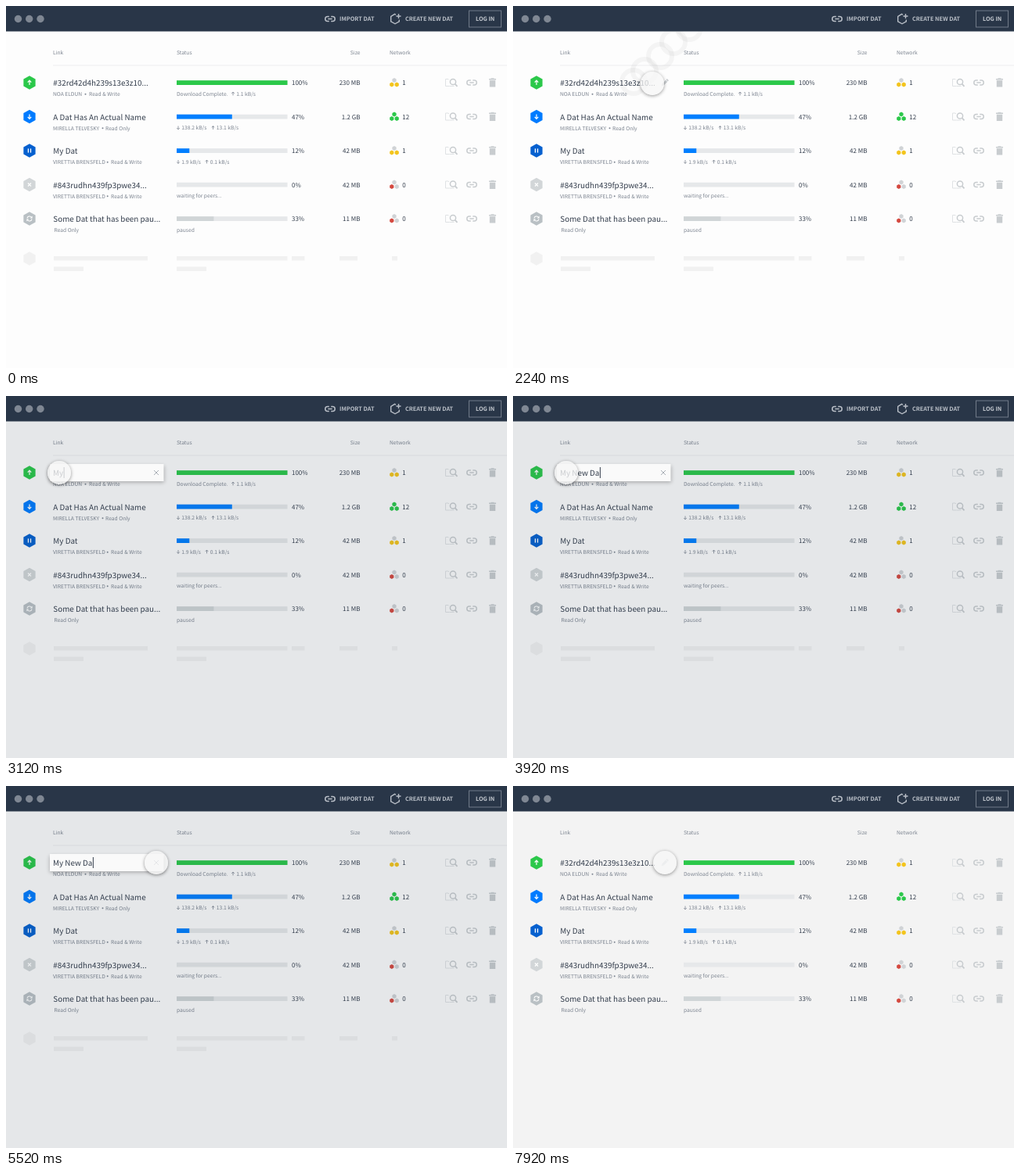
An HTML page with a canvas that plays this animation: 640x463 px, repeating every 8000 ms.

```html
<!DOCTYPE html>
<html lang="en">
<head>
<meta charset="utf-8">
<title>Dat list</title>
<style>
html, body { margin: 0; width: 100%; height: 100%; overflow: hidden; background: #fdfdfd; }
canvas { display: block; width: 640px; height: 463px; }
</style>
</head>
<body>
<canvas id="stage"></canvas>
<script>
const W = 640, H = 463, LOOP = 8000, STEP = 80;
const OPEN = 2320, CLOSE = 5840, ENTER = 1840;
const TYPE_START = 2960, TYPE_PACE = 100, TYPED = 'My New Da';
const FAMILY = '"Noto Sans CJK JP", "Noto Sans CJK SC", "Noto Sans CJK KR", "Noto Sans CJK", "Open Sans", sans-serif';
const NAVY = '#293648', INK = '#333d4c', MUTED = '#7d8591', ICON = '#c8cccf';
const GREEN = '#2bc84a', BLUE = '#007fff', YELLOW = '#f3c41c', RED = '#d4483f', GREY = '#d2d6d8';

const rows = [
  { icon: 'up', hue: GREEN, title: '#32rd42d4h239s13e3z10...', who: 'NOA ELDUN', dot: 101.5, mode: 'Read & Write', modeX: 106,
    done: 1, pct: '100%', bar: GREEN, note: 'Download Complete.', rates: [['up', 290, '1.1 kB/s']], size: '230 MB', peers: 1 },
  { icon: 'down', hue: '#007bff', title: 'A Dat Has An Actual Name', who: 'MIRELLA TELVESKY', dot: 123.5, mode: 'Read Only', modeX: 127,
    done: .5, pct: '47%', bar: BLUE, rates: [['down', 220, '138.2 kB/s'], ['up', 264.5, '13.1 kB/s']], size: '1.2 GB', peers: 12 },
  { icon: 'pause', hue: '#0660cf', title: 'My Dat', who: 'VIRETTIA BRENSFELD', dot: 129.7, mode: 'Read & Write', modeX: 134,
    done: .115, pct: '12%', bar: BLUE, rates: [['down', 220, '1.9 kB/s'], ['up', 256.5, '0.1 kB/s']], size: '42 MB', peers: 1 },
  { icon: 'cross', hue: GREY, title: '#843rudhn439fp3pwe34...', who: 'VIRETTIA BRENSFELD', dot: 129.7, mode: 'Read & Write', modeX: 134,
    done: 0, pct: '0%', bar: GREY, note: 'waiting for peers...', rates: [], size: '42 MB', peers: 0 },
  { icon: 'sync', hue: '#b9c0c4', title: 'Some Dat that has been pau...', mode: 'Read Only', modeX: 61.5,
    done: .335, pct: '33%', bar: '#d0d5d7', note: 'paused', rates: [], size: '11 MB', peers: 0 }
];

// Pointer path: [time, x, y, eased]
const path = [
  [1840, 225, 28], [1920, 205, 46], [2000, 188, 64], [2080, 168, 83], [2160, 154, 97],
  [2240, 178, 99], [2480, 178, 100], [2960, 68, 98, 1], [4560, 68, 98], [5280, 192, 98, 1],
  [5920, 192, 98], [6320, 194, 146, 1], [7040, 194, 146], [7520, 194, 98, 1]
];

const canvas = document.getElementById('stage');
const ctx = canvas.getContext('2d');
const ratio = window.devicePixelRatio || 1;
canvas.width = W * ratio;
canvas.height = H * ratio;
ctx.scale(ratio, ratio);
ctx.textRendering = 'geometricPrecision';

function text(str, x, y, size, color, { align = 'left', weight = 400 } = {}) {
  ctx.font = `${weight} ${size}px ${FAMILY}`;
  ctx.textAlign = align;
  ctx.fillStyle = color;
  ctx.fillText(str, x, y);
}

function rect(x, y, w, h, color) {
  ctx.fillStyle = color;
  ctx.fillRect(x, y, w, h);
}

function disc(x, y, r, color) {
  ctx.beginPath();
  ctx.arc(x, y, r, 0, Math.PI * 2);
  ctx.fillStyle = color;
  ctx.fill();
}

function lines(color, width, ...paths) {
  ctx.beginPath();
  for (const p of paths) {
    ctx.moveTo(p[0], p[1]);
    for (let i = 2; i < p.length; i += 2) ctx.lineTo(p[i], p[i + 1]);
  }
  ctx.strokeStyle = color;
  ctx.lineWidth = width;
  ctx.stroke();
}

function hexagon(x, y, r, color) {
  ctx.beginPath();
  for (let i = 0; i < 6; i++) {
    const a = (i + .5) * Math.PI / 3;
    ctx.lineTo(x + r * Math.cos(a), y + r * Math.sin(a));
  }
  ctx.closePath();
  ctx.fillStyle = color;
  ctx.fill();
}

function arrow(x, y, dir, r, color, width) {
  const s = dir === 'up' ? -1 : 1;
  const tip = y + s * r, wing = tip - s * r * .85;
  lines(color, width, [x, y - s * r, x, tip], [x - r * .8, wing, x, tip, x + r * .8, wing]);
}

function cross(x, y, r, color, width) {
  lines(color, width, [x - r, y - r, x + r, y + r], [x + r, y - r, x - r, y + r]);
}

function linkIcon(x, y, color) {
  ctx.strokeStyle = color;
  ctx.lineWidth = 1.5;
  for (const s of [-1, 1]) {
    ctx.beginPath();
    ctx.moveTo(x + s * 1.2, y - 3);
    ctx.lineTo(x + s * 3.2, y - 3);
    ctx.arc(x + s * 3.2, y, 3, -Math.PI / 2, Math.PI / 2, s < 0);
    ctx.lineTo(x + s * 1.2, y + 3);
    ctx.stroke();
  }
  lines(color, 1.5, [x - 2.7, y, x + 2.7, y]);
}

function searchIcon(x, y) {
  lines('#dfe2e4', 1, [x - 2, y + 4.5, x - 7, y + 4.5, x - 7, y - 4.5, x - 3.5, y - 4.5, x - 2.5, y - 3.5]);
  lines('#dfe2e4', 1, [x - 2, y + 4.5, x + 4, y + 4.5]);
  ctx.beginPath();
  ctx.arc(x + 2.5, y - 1, 3.6, 0, Math.PI * 2);
  ctx.strokeStyle = ICON;
  ctx.lineWidth = 1.5;
  ctx.stroke();
  lines(ICON, 1.8, [x + 5, y + 1.7, x + 8, y + 4.8]);
}

function trashIcon(x, y) {
  rect(x - 4.5, y - 5, 9, 1.5, ICON);
  rect(x - 2, y - 5.7, 4, 1, ICON);
  rect(x - 3.7, y - 2.8, 7.4, 8.3, ICON);
}

function pencilIcon(x, y) {
  ctx.save();
  ctx.translate(x, y);
  ctx.rotate(-Math.PI / 4);
  rect(-3.2, -1.5, 6.2, 3, ICON);
  rect(3.7, -1.5, 1.8, 3, ICON);
  ctx.beginPath();
  ctx.moveTo(-3.2, -1.5);
  ctx.lineTo(-6, 0);
  ctx.lineTo(-3.2, 1.5);
  ctx.fill();
  ctx.restore();
}

function syncIcon(x, y) {
  ctx.strokeStyle = '#fff';
  ctx.lineWidth = 1.1;
  for (const a of [0, Math.PI]) {
    ctx.save();
    ctx.translate(x, y);
    ctx.rotate(a);
    ctx.beginPath();
    ctx.arc(0, 0, 3, Math.PI * 1.05, Math.PI * 1.8);
    ctx.stroke();
    ctx.beginPath();
    ctx.moveTo(3.6, -3.4);
    ctx.lineTo(3.6, -.4);
    ctx.lineTo(.8, -.4);
    ctx.fillStyle = '#fff';
    ctx.fill();
    ctx.restore();
  }
}

function statusIcon(row, y) {
  const x = 30;
  hexagon(x, y, 8.8, row.hue);
  if (row.icon === 'pause') {
    rect(x - 2.2, y - 2.6, 1.3, 5.2, '#fff');
    rect(x + .9, y - 2.6, 1.3, 5.2, '#fff');
  } else if (row.icon === 'cross') cross(x, y, 2, '#fff', 1.2);
  else if (row.icon === 'sync') syncIcon(x, y);
  else arrow(x, y, row.icon, 2.9, '#fff', 1.2);
}

function peersIcon(peers, y) {
  const hue = peers > 1 ? GREEN : peers ? YELLOW : RED;
  hexagon(496, y - 3, 3, peers > 1 ? hue : '#d0d3d6');
  hexagon(492.8, y + 2.6, 3, hue);
  hexagon(499.2, y + 2.6, 3, peers ? hue : '#d0d3d6');
}

function drawRow(row, i) {
  const y = 98 + i * 43.5, low = y + 17;
  statusIcon(row, y);
  text(row.title, 60.3, y + 4, 9.85, INK);
  if (row.who) {
    text(row.who, 60, low, 6.7, MUTED);
    disc(row.dot, low - 2.3, 1, MUTED);
  }
  text(row.mode, row.modeX, low, 6.7, MUTED);

  rect(218, y - 2.8, 141.5, 5.8, '#e6e8ea');
  rect(218, y - 2.8, 141.5 * row.done, 5.8, row.bar);
  text(row.pct, 365, y + 3, 7.9, INK);
  if (row.note) text(row.note, 218, low - .5, 6.7, MUTED);
  for (const [dir, x, rate] of row.rates) {
    arrow(x, low - 2.8, dir, 2.2, MUTED, .8);
    text(rate, x + 4.3, low - .5, 6.7, MUTED);
  }

  text(row.size, 452.5, y + 3, 8, INK, { align: 'right' });
  peersIcon(row.peers, y);
  text(row.peers, 506.3, y + 3, 8, INK);
  searchIcon(568.5, y);
  linkIcon(595, y, ICON);
  trashIcon(621.5, y);
}

function drawPlaceholder() {
  const pale = '#f1f1f1';
  hexagon(30, 323, 8.8, pale);
  for (const [x, w] of [[61, 120], [218, 141.5], [365, 16.5], [426, 23], [493, 7]]) rect(x, 320, w, 5.5, pale);
  for (const x of [61, 218]) rect(x, 333.5, 38, 5.5, pale);
}

function drawHeader() {
  rect(0, 0, W, 32.5, NAVY);
  for (const x of [15.5, 29.7, 44]) disc(x, 16.5, 4.7, '#7f8793');
  const pale = '#b9bfc7', bold = { weight: 600 };
  linkIcon(414, 16.5, pale);
  text('IMPORT DAT', 426, 19.4, 7.4, pale, bold);
  lines(pale, 1.4, [498, 11.2, 496.5, 10.4, 491.7, 13.3, 491.7, 19.8, 497, 22.8, 502.3, 19.8, 502.3, 17.5]);
  lines(pale, 1.4, [501.5, 10, 501.5, 16], [498.5, 13, 504.5, 13]);
  text('CREATE NEW DAT', 510, 19.4, 7.3, pale, bold);
  ctx.strokeStyle = '#717b89';
  ctx.lineWidth = 1;
  ctx.strokeRect(591.5, 6, 41, 21);
  text('LOG IN', 600, 19.4, 7.3, '#c3c8cf', bold);
}

function drawEditor(t) {
  ctx.save();
  ctx.shadowColor = 'rgba(0,0,0,.28)';
  ctx.shadowBlur = 5 * ratio;
  ctx.shadowOffsetY = 1.5 * ratio;
  rect(56, 87, 145.5, 22, '#fafafa');
  ctx.restore();
  const count = Math.max(0, Math.floor((t - TYPE_START) / TYPE_PACE) + 1);
  const typed = TYPED.slice(0, count);
  let caret = 59.5;
  if (typed) {
    text(typed, 60, 102, 9.85, INK);
    caret = 61 + ctx.measureText(typed).width;
  } else text('Edit name...', 60, 102, 9.85, '#8d949d');
  rect(caret - .5, 91, 1, 14, INK);
  cross(192, 98, 3, '#a9afb6', 1);
}

function pointerAt(t) {
  const next = path.findIndex(k => k[0] > t);
  if (next < 0) return path[path.length - 1].slice(1, 3);
  const [t0, x0, y0] = path[next - 1], [t1, x1, y1, eased] = path[next];
  let p = (t - t0) / (t1 - t0);
  if (eased) p = p * p * (3 - 2 * p);
  return [x0 + (x1 - x0) * p, y0 + (y1 - y0) * p];
}

function drawTrail(t) {
  ctx.save();
  ctx.beginPath();
  ctx.rect(0, 32.5, W, H);
  ctx.clip();
  ctx.strokeStyle = 'rgba(0,0,0,.035)';
  ctx.lineWidth = 6;
  for (let past = ENTER; past < t; past += STEP) {
    const [x, y] = pointerAt(past);
    ctx.beginPath();
    ctx.arc(x, y, 15, 0, Math.PI * 2);
    ctx.stroke();
  }
  ctx.restore();
}

function drawPointer(x, y) {
  // Shadow is kept outside the translucent disc.
  ctx.save();
  ctx.beginPath();
  ctx.rect(0, 0, W, H);
  ctx.arc(x, y, 15, 0, Math.PI * 2);
  ctx.clip('evenodd');
  ctx.shadowColor = 'rgba(0,0,0,.42)';
  ctx.shadowBlur = 4 * ratio;
  ctx.shadowOffsetY = ratio;
  disc(x, y, 15, '#e8e8e8');
  ctx.restore();
  disc(x, y, 15, 'rgba(246,246,246,.78)');
}

function draw(t) {
  const editing = t >= OPEN && t < CLOSE, closed = t >= CLOSE;
  rect(0, 0, W, H, closed ? '#f3f3f3' : '#fdfdfd');
  text('Link', 60, 62, 6.7, MUTED);
  text('Status', 218, 62, 6.7, MUTED);
  text('Size', 452.5, 62, 6.7, MUTED, { align: 'right' });
  text('Network', 490, 62, 6.7, MUTED);
  if (!closed) {
    rect(60, 75.5, 580, 1, '#eeeeef');
    drawPlaceholder();
  }
  rows.forEach(drawRow);
  if (closed || (t >= 2160 && !editing)) pencilIcon(194, 98);
  if (editing) rect(0, 32.5, W, H, 'rgba(41,54,72,.11)');
  drawHeader();
  if (editing) drawEditor(t);
  if (t >= ENTER) {
    if (t < OPEN) drawTrail(t);
    drawPointer(...pointerAt(t));
  }
}

const start = performance.now();
function tick() {
  const t = (performance.now() - start) % LOOP;
  draw(Math.floor(t / STEP) * STEP);
  requestAnimationFrame(tick);
}
tick();
</script>
</body>
</html>
```
